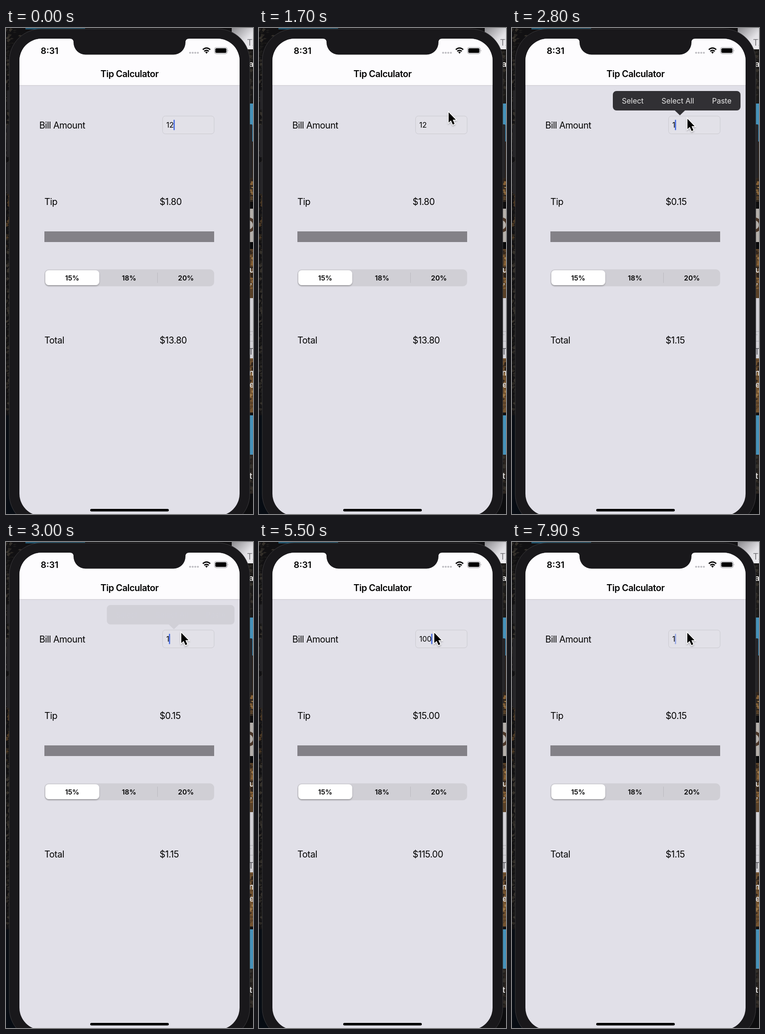
Recreate the animation shown at these times as an HTML page. Size 534 px wide and 1049 px high, loop 8000 ms.

```html
<!DOCTYPE html>
<html lang="en">
<head>
<meta charset="utf-8">
<title>Tip Calculator</title>
<style>
  html, body { margin: 0; width: 100%; height: 100%; overflow: hidden; background: #0c0c0e; }
  svg { display: block; width: 534px; height: 1049px; font-family: Inter, Roboto, sans-serif; }
  .label { font-size: 19.5px; letter-spacing: -.023em; }
  .title { font-size: 19.5px; font-weight: 600; letter-spacing: -.023em; }
  .seg { font-size: 15px; font-weight: 600; text-anchor: middle; }
  .menu { font-size: 16px; text-anchor: middle; fill: #fff; }
  .side { font-weight: 600; fill: #e8e6e4; font-size: 18px; }
</style>
</head>
<body>
<svg viewBox="0 0 534 1049">
  <defs>
    <clipPath id="screen"><rect x="29" y="23" width="476" height="1030" rx="48"/></clipPath>
    <linearGradient id="paper" x2="1" y2="1">
      <stop stop-color="#8a898d"/><stop offset=".6" stop-color="#e2e1e5"/><stop offset="1" stop-color="#f0eff2"/>
    </linearGradient>
    <filter id="shadow" x="-30%" y="-30%" width="160%" height="180%">
      <feDropShadow dx="0" dy="2" stdDeviation="1.6" flood-opacity=".28"/>
    </filter>
  </defs>

  <!-- desktop behind the phone -->
  <rect width="534" height="1049" fill="#111012"/>
  <g id="rocks"></g>
  <rect x="42" width="129" height="3" fill="#24566f"/>
  <rect y="836" width="30" height="213" fill="#070c13"/>
  <g id="panels"></g>
  <g>
    <text x="521" y="38" font-size="18" fill="#77767b">TX</text>
    <text class="side" x="525" y="84">a</text>
    <circle cx="524" cy="425" r="13" fill="none" stroke="#4a3527" stroke-width="6"/>
    <text class="side" x="526" y="528">u</text>
    <text class="side" x="527" y="554">.</text>
    <path d="M527 655h7M527 662h4M527 676h7" stroke="#a9a8ae"/>
    <text x="524" y="705" font-size="18" fill="#55545a">T</text>
    <text class="side" x="525" y="750">n</text>
    <text class="side" x="526" y="776">e</text>
    <text class="side" x="526" y="973">t</text>
  </g>

  <!-- phone body -->
  <g fill="#242326">
    <rect x="2" y="135" width="8" height="41" rx="2"/>
    <rect x="1" y="209" width="9" height="70" rx="2"/>
    <rect x="1" y="289" width="9" height="69" rx="2"/>
    <rect x="524" y="208" width="8.500" height="116" rx="2"/>
  </g>
  <rect x="7" y="2" width="520" height="1073" rx="69" fill="#19181b" stroke="#3b3a3d"/>

  <!-- screen -->
  <g clip-path="url(#screen)">
    <rect x="29" y="23" width="476" height="1030" fill="#e1e0e8"/>
    <rect x="29" y="23" width="476" height="101" fill="#fdfcfe"/>
    <rect x="29" y="123.500" width="476" height="1" fill="#c5c4ca"/>
  </g>
  <path d="M138 22H396V23Q388 23 388 31A26 26 0 0 1 362 57.500H172A26 26 0 0 1 146 31Q146 23 138 23Z" fill="#19181b"/>
  <text x="75" y="56" font-size="19" font-weight="600">8:31</text>
  <g fill="#bdbcc1">
    <circle cx="398" cy="53.500" r="2.100"/><circle cx="403.600" cy="53.500" r="2.100"/>
    <circle cx="409.200" cy="53.500" r="2.100"/><circle cx="414.800" cy="53.500" r="2.100"/>
  </g>
  <g fill="none" stroke="#000" stroke-width="2.800">
    <path d="M425.500 46.800Q433.500 39.500 441.500 46.800M428.600 50.300Q433.500 46 438.400 50.300"/>
    <path d="M430.700 52.200Q433.500 50 436.300 52.200L433.500 55.500Z" fill="#000" stroke="none"/>
  </g>
  <rect x="450.700" y="42" width="27.600" height="13.600" rx="4" fill="none" stroke="#a4a3a7" stroke-width="1.200"/>
  <rect x="452.500" y="43.800" width="24" height="10" rx="2.500"/>
  <path d="M479.500 46.500Q481.500 48.800 479.500 51Z" fill="#a4a3a7"/>

  <text class="title" x="267" y="105.500" text-anchor="middle">Tip Calculator</text>
  <text class="label" x="72" y="217">Bill Amount</text>
  <rect x="338.500" y="190" width="111.500" height="38.500" rx="6" fill="#e2e1e8" stroke="#cbcad0"/>
  <text id="bill" x="346.500" y="215" font-size="16"></text>
  <rect id="caret" y="198" width="2.400" height="22.500" rx="1" fill="#3a62e2"/>

  <text class="label" x="83" y="381.500">Tip</text>
  <text class="label" x="332" y="381.500" id="tip"></text>
  <rect x="83" y="439" width="367" height="23" fill="#838187"/>

  <rect x="83" y="521" width="367" height="36.500" rx="9" fill="#d0cfd5"/>
  <rect x="85" y="523" width="116.500" height="32" rx="7.500" fill="#fff" filter="url(#shadow)"/>
  <rect x="327" y="528" width="1" height="22" fill="#bbbac0"/>
  <text class="seg" x="143" y="544.500">15%</text>
  <text class="seg" x="266" y="544.500">18%</text>
  <text class="seg" x="389" y="544.500">20%</text>

  <text class="label" x="83" y="680.500">Total</text>
  <text class="label" x="332" y="680.500" id="total"></text>
  <rect x="182" y="1038" width="170" height="5.500" rx="2.750"/>

  <g id="menu">
    <path d="M226 136H486a8 8 0 0 1 8 8V170a8 8 0 0 1-8 8H374L363 188.500 352 178H226a8 8 0 0 1-8-8V144a8 8 0 0 1 8-8Z" fill="#1f1e21"/>
    <g id="menuText">
      <text class="menu" x="261" y="162.500">Select</text>
      <text class="menu" x="358.500" y="162.500">Select All</text>
      <text class="menu" x="453.500" y="162.500">Paste</text>
    </g>
  </g>
  <path id="pointer" d="M0 0V22L5 17.500 9 26.500 12.800 24.800 8.900 16H15.500Z" fill="#000" stroke="#fff" stroke-width="3" paint-order="stroke" filter="url(#shadow)"/>
</svg>
<script>
const LOOP = 8000, STEP = 100, TIP_RATE = 0.15;
const $ = id => document.getElementById(id);

function add(parent, tag, attrs) {
  const node = document.createElementNS('http://www.w3.org/2000/svg', tag);
  for (const name in attrs) node.setAttribute(name, attrs[name]);
  parent.append(node);
}

let seed = 7;
const random = () => (seed = (seed * 16807) % 2147483647) / 2147483647;
const pick = list => list[Math.floor(random() * list.length)];

function rocks(parent, x, width, top, bottom, colors) {
  for (let y = top; y < bottom; y += 3 + random() * 5) {
    const left = x + random() * width, h = Math.min(3 + random() * 7, bottom - y);
    add(parent, 'path', { d: `M${left} ${y}l${3 + random() * 6} ${h * .3}l-5 ${h * .7}l-4 ${-h * .4}Z`, fill: pick(colors) });
  }
}

const darkRock = ['#2a2723', '#1d1c1b', '#34302a', '#191817'];
rocks($('rocks'), 0, 7, 0, 330, darkRock);
rocks($('rocks'), 0, 7, 330, 480, ['#4a3722', '#2e261d', '#1c1a18']);
rocks($('rocks'), 0, 7, 480, 835, darkRock);
rocks($('rocks'), 8, 26, 0, 34, darkRock);

const panel = (y, end, fill, x = 505) => add($('panels'), 'rect', { x, y, width: 534 - x, height: end - y, fill });
panel(0, 46, 'url(#paper)', 488);
panel(46, 163, '#1b1918');
panel(163, 245, '#4592ba');
panel(245, 375, '#33281e');
panel(375, 390, '#0d0c0d');
panel(390, 462, '#b5b0ab');
panel(462, 477, '#09090a');
panel(477, 583, '#5a4127');
panel(583, 713, '#d3d2d7');
panel(713, 830, '#74532f');
panel(830, 836, '#101012');
panel(836, 921, '#4592ba');
panel(921, 1005, '#2a2420');
panel(1005, 1049, '#0d0d0f');
const brown = ['#8a6336', '#5c4228', '#2e2219', '#a07a48'];
rocks($('panels'), 526, 6, 50, 160, darkRock);
rocks($('panels'), 526, 6, 325, 370, brown);
rocks($('panels'), 526, 6, 480, 580, brown);
rocks($('panels'), 526, 6, 716, 826, brown);
rocks($('panels'), 526, 6, 924, 1000, darkRock);

// [time, bill text]; every entry also restarts the caret blink
const edits = [
  [-100, '12'], [2300, '12'], [2800, '1'], [3200, ''], [4400, '1'], [5000, '10'],
  [5300, '100'], [5700, '10'], [5800, '1'], [5900, ''], [6900, '1']
];
const menuFade = [[2350, 0], [2400, .29], [2550, 1], [2780, 1], [2900, .4], [3000, .08], [3100, 0]];
const pointerX = [[1500, 452], [1700, 410], [2100, 380], [2400, 380], [3000, 379]];
const pointerY = [[1500, 163], [1700, 182], [2100, 196]];

function track(keys, t) {
  if (t <= keys[0][0]) return keys[0][1];
  for (let i = 1; i < keys.length; i++) {
    const [t0, v0] = keys[i - 1], [t1, v1] = keys[i];
    if (t < t1) return v0 + (v1 - v0) * (t - t0) / (t1 - t0);
  }
  return keys[keys.length - 1][1];
}

function caretOpacity(age) {
  if (age < 500) return 1;
  const q = (age - 500) % 1000;
  if (q < 300) return 1 - q / 300;
  return Math.min(1, Math.max(0, (q - 400) / 200));
}

const money = value => '$' + value.toFixed(2);

function draw(t) {
  const [since, text] = edits.filter(e => e[0] <= t).pop();
  const amount = Number(text), fade = track(menuFade, t);
  $('bill').textContent = text;
  $('tip').textContent = money(amount * TIP_RATE);
  $('total').textContent = money(amount * (1 + TIP_RATE));
  $('caret').setAttribute('x', text ? 342.3 + 10 * text.length : 345.5);
  $('caret').setAttribute('opacity', caretOpacity(t - since));
  $('menu').setAttribute('opacity', fade);
  $('menuText').setAttribute('opacity', fade);
  $('pointer').setAttribute('transform', `translate(${track(pointerX, t)} ${track(pointerY, t)})`);
  $('pointer').setAttribute('visibility', t < 1500 ? 'hidden' : 'visible');
}

const start = performance.now();
function tick() {
  const t = (performance.now() - start) % LOOP;
  draw(Math.floor(t / STEP) * STEP);
  requestAnimationFrame(tick);
}
tick();
</script>
</body>
</html>
```
